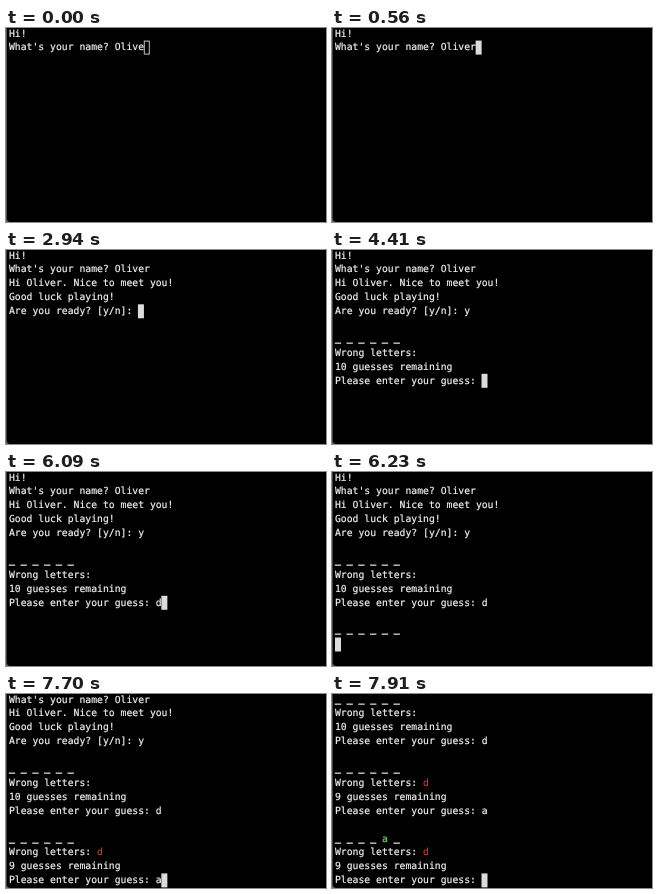
These frames come from a looping animation (320 by 194 pixels, 8000 ms). An HTML page:

```html
<!DOCTYPE html>
<html lang="en">
<head>
<meta charset="utf-8">
<title>Word guessing game in a terminal</title>
<style>
  html, body { margin: 0; width: 100%; height: 100%; overflow: hidden; background: #5c7872; }
  #term {
    position: absolute; left: 0; top: 0; width: 320px; height: 194px;
    box-sizing: border-box; overflow: hidden; background: #000;
    border-left: 1px solid #3c4644; border-bottom-left-radius: 4px;
  }
  #term.idle { border-left-color: #4a5452; }
  #text {
    position: absolute; left: 2px; top: -0.5px; margin: 0;
    font: 9.75px/13.9px "DejaVu Sans Mono", monospace;
    font-variant-ligatures: none; text-rendering: geometricPrecision;
    -webkit-text-stroke: 0.2px; color: #f2f2f2; white-space: pre;
  }
  .blank { position: relative; top: -1px; -webkit-text-stroke-width: 0.6px; }
  .miss { color: #c23a2e; }
  .hit { color: #62d962; }
  #cursor {
    position: absolute; left: 0; top: 0; width: 6px; height: 14px;
    box-sizing: border-box; background: #dcdcdc;
  }
  .idle #cursor { background: none; border: 1px solid #c4c4c4; }
</style>
</head>
<body>
<div id="term"><pre id="text"></pre><div id="cursor"></div></div>
<script>
const LOOP = 8000, ROWS = 14, CELL = 5.86, LINE = 13.9;
const term = document.getElementById("term");
const text = document.getElementById("text");
const cursor = document.getElementById("cursor");

// Each step adds output at its time; ~ marks a wrong letter, ^ a right one.
const steps = [
  [0, "Hi!\nWhat's your name? Olive"],
  [280, ""],
  [560, "r"],
  [1540, "\n"],
  [1890, "Hi Oliver. Nice to meet you!\n"],
  [2940, "Good luck playing!\nAre you ready? [y/n]: "],
  [4410, "y\n\n_ _ _ _ _ _\nWrong letters:\n10 guesses remaining\nPlease enter your guess: "],
  [6090, "d"],
  [6160, "\n"],
  [6230, "\n_ _ _ _ _ _\n"],
  [6300, "Wrong letters: ~d\n9 guesses remaining\nPlease enter your guess: "],
  [7700, "a"],
  [7910, "\n\n_ _ _ _ ^a _\nWrong letters: ~d\n9 guesses remaining\nPlease enter your guess: "]
];

let log = "";
const screens = steps.map(([at, out]) => ({ at, lines: (log += out).split("\n").slice(-ROWS) }));

const paint = line => line
  .replace(/_/g, '<span class="blank">_</span>')
  .replace(/~(.)/g, '<span class="miss">$1</span>')
  .replace(/\^(.)/g, '<span class="hit">$1</span>');

function show(screen) {
  const lines = screen.lines, row = lines.length - 1;
  text.innerHTML = lines.map(paint).join("\n");
  term.classList.toggle("idle", screen.at === 0);
  const x = 2 + lines[row].length * CELL, y = row * LINE - 1.3;
  cursor.style.transform = `translate(${x}px, ${y}px)`;
}

const start = performance.now();
let current = null;

function tick() {
  const t = (performance.now() - start) % LOOP;
  const screen = screens.filter(s => s.at <= t).pop();
  if (screen !== current) show(current = screen);
  requestAnimationFrame(tick);
}
tick();
</script>
</body>
</html>
```
